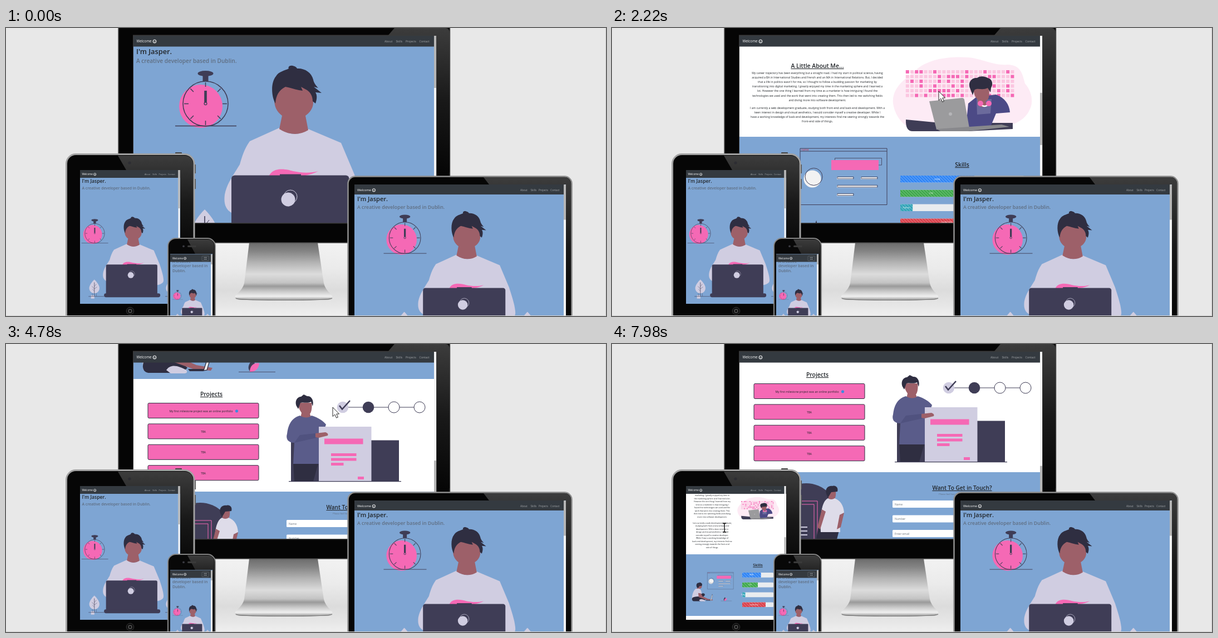
An HTML page that plays this animation: 1078 px wide and 519 px high, repeating every 8000 ms.

```html
<!DOCTYPE html>
<html lang="en">
<head>
<meta charset="utf-8">
<title>Responsive portfolio</title>
<style>
  html, body { margin: 0; width: 100%; height: 100%; overflow: hidden; background: #e8e8e8; }
  svg { display: block; width: 1078px; height: 519px; }
  text { font-family: 'Open Sans', 'Noto Sans', sans-serif; white-space: pre; }
  .mid { text-anchor: middle; }
  .bold { font-weight: 600; }
  .head { font-weight: 600; text-decoration: underline; }
</style>
</head>
<body>
<svg id="stage" viewBox="0 0 1078 519"></svg>
<script>
const BLUE = '#7ea5d3', PINK = '#f569b5', LILAC = '#d0cde1', DARK = '#3f3d56',
      HAIR = '#2f2e41', SKIN = '#9d6069', INK = '#212529', MUTED = '#5f6e82', NAV = '#343a40';

const rect = (x, y, w, h, fill, more = '') =>
  `<rect x="${x}" y="${y}" width="${w}" height="${h}" fill="${fill}" ${more}/>`;
const circle = (x, y, r, fill, more = '') => `<circle cx="${x}" cy="${y}" r="${r}" fill="${fill}" ${more}/>`;
const path = (d, fill, more = '') => `<path d="${d}" fill="${fill}" ${more}/>`;
const line = (d, width = 1, color = DARK) => path(d, 'none', `stroke="${color}" stroke-width="${width}"`);
const text = (x, y, size, fill, str, more = '') =>
  `<text x="${x}" y="${y}" font-size="${size}" fill="${fill}" ${more}>${str}</text>`;
const mid = (x, y, size, fill, str) => text(x, y, size, fill, str, 'class="mid"');
const head = (x, y, size, str) => text(x, y, size, INK, str, 'class="mid head"');
const shift = (y, body) => `<g transform="translate(0 ${y})">${body}</g>`;
const place = (id, x, y, k) => `<use href="#${id}" transform="translate(${x} ${y}) scale(${k})"/>`;
const clip = (id, x, y, w, h) => `<clipPath id="${id}">${rect(x, y, w, h, '#000')}</clipPath>`;
const fade = (id, stops) => `<linearGradient id="${id}" x2="0" y2="1">` +
  stops.map(([o, c]) => `<stop offset="${o}" stop-color="${c}"/>`).join('') + '</linearGradient>';

// Illustrations
function plant(x) {
  return `<g transform="translate(${x} 0)">` +
    path('M0 327C8 335 21 350 21 362C21 376 11 384 0 384C-11 384 -21 376 -21 362C-21 350 -8 335 0 327Z', LILAC) +
    rect(-14, 392, 14, 14, LILAC) + line('M0 339V397', 1.6) +
    line('M0 356L8 346M0 366L-10 355M0 366L11 358M0 375L-8 367M-8 384V397M8 384V397') +
    line('M-24 397H41', 1.4) + '</g>';
}

function stopwatch() {
  let ticks = '';
  for (let a = 0; a < 360; a += 45)
    ticks += `<path d="M0 -38.5V-30.5" stroke="${DARK}" stroke-width="1.5" transform="translate(358.5 136.5) rotate(${a})"/>`;
  return circle(350, 141, 39, PINK) +
    circle(358.5, 136.5, 40.5, 'none', `stroke="${DARK}" stroke-width="1.5"`) + ticks +
    `<ellipse cx="358.5" cy="82" rx="14" ry="5" fill="${DARK}"/>` + rect(353.5, 84, 10, 12, DARK) +
    rect(356.2, 113, 4.6, 21, DARK) + circle(358.5, 136.2, 2.4, PINK, `stroke="${DARK}" stroke-width="1.3"`) +
    line('M304 176.5H414', 1.3);
}

const hero = stopwatch() + plant(357) + plant(673) +
  path('M491 180L438 204C428 218 424 232 420 246C408 266 397 280 393 300C391 316 394 326 405 333L616 350C634 346 643 340 642 328C641 308 632 284 626 264L602 207L543 182Q516 201 491 180Z', LILAC) +
  path('M482 128C482 112 495 102 517 102C540 104 552 116 552 134C552 146 544 154 538 158L543 184Q518 199 491 182L496 158C486 150 482 142 482 128Z', SKIN) +
  path('M484 136C477 124 475 99 485 87C490 78 501 77 508 73C506 70 510 67 515 68C520 69 522 71 523 73C536 72 549 80 552 93C553 99 557 104 561 108L553 106L567 117L556 116C560 122 558 130 556 136L551 132C551 123 547 116 541 112L530 106L533 113C521 112 510 107 502 106C490 112 485 122 484 136Z', HAIR) +
  path('M472 268C478 251 500 253 516 258C530 261 546 262 561 258C546 266 520 270 500 270Z', PINK) +
  rect(492, 263.5, 38, 4, DARK) + rect(405, 265.5, 211.5, 124, DARK, 'rx="6"') +
  rect(397, 384.5, 231.5, 15.8, DARK, 'rx="7"') +
  circle(507, 309, 12.5, LILAC) + circle(511, 304, 12, 'none', `stroke="${LILAC}"`);

function calendar() {
  let seed = 7, cells = '';
  for (let i = 0; i < 144; i++) {
    seed = (seed * 16807) % 2147483647;
    cells += rect(527.8 + (i % 24) * 8.2, 190 + Math.floor(i / 24) * 8.5, 6, 6,
      seed / 2147483647 < 0.35 ? PINK : '#fbc6e0');
  }
  return cells;
}

const about = shift(260,
  path('M505 250C502 220 530 204 548 188C572 168 610 165 640 167C668 170 686 182 710 180C736 180 738 200 742 214C756 230 757 250 750 262C742 280 722 290 690 296L545 299C520 290 508 270 505 250Z', '#fdebf5') +
  calendar() +
  path('M528 279L590 285H720V296L640 300H540Q527 300 528 279Z', DARK) +
  path('M640 250L655 238L690 234C706 240 714 252 715 266L690 268L680 292H636Z', '#4c4a86') +
  path('M655 242H682L680 268L656 270Z', '#6b6a9c') +
  path('M650 220H677C679 236 677 244 671 246L673 254Q664 260 657 252L657 243C652 238 649 232 650 220Z', SKIN) +
  path('M643 222C639 211 647 203 656 204C662 199 672 202 675 204C684 206 685 216 681 222L680 230L675 222C666 227 656 221 651 226L648 235Z', HAIR) +
  line('M659 248Q669 262 680 248', 2.5, '#fff') + circle(662, 250, 5, PINK) + circle(677, 250, 5, PINK) +
  path('M570 246L629 240Q632 240 633 243L642 294L583 297Z', '#9b9b9d') +
  path('M583 296L700 288L714 292L640 300H590Z', '#88888c') + circle(608, 269, 3, '#b5b5b8'));

function pageLine(x, y, w) {
  return rect(x, y, w, 3.6, '#f2f2f2') + line(`M${x + 1} ${y - .6}H${x + w + 1}V${y + 2.6}H${x + 1}Z`, .8);
}

const skills = shift(510,
  line('M338 81H494V182.5H338ZM338 86H494') + text(340, 85.3, 5, '#c8324f', 'name') +
  rect(394, 102, 85, 18, PINK) + line('M400.5 102V98.5H484.5V111H479', .8) +
  circle(360, 136, 15.5, '#f2f2f2') + circle(362.5, 132, 15.5, 'none', `stroke="${DARK}"`) +
  pageLine(404, 133, 29) + pageLine(447, 133, 29) + pageLine(404, 148, 72) + pageLine(404, 163, 29)) +
  shift(580,
  path('M278 90H304C306 99 303 107 296 109C292 110 290 111 289 117L270 112L279 104Z', SKIN) +
  path('M274 99C269 85 275 74 287 74C293 71 299 73 301 76C308 79 308 88 304 93L297 94C291 92 288 96 287 101L280 106Q276 104 274 99Z', HAIR) +
  path('M268 110L288 109C299 114 303 126 305 146L296 164L262 172L247 180C242 158 252 122 268 110Z', LILAC) +
  path('M296 146C304 138 314 135 321 141L323 148L306 166Z', HAIR) +
  path('M247 166C258 154 296 154 312 162L326 176L316 185H256C247 184 244 176 247 166Z', HAIR) +
  path('M283 136L299 138L309 156L342 171L371 176L368 181L336 178L286 160Z', SKIN) +
  path('M288 180C296 168 310 172 324 180Q328 186 318 186H296Z', LILAC) +
  path('M327 178H355V182H330Z', HAIR) +
  path('M355 181L367 143L369 152L361 180Z', '#f2f2f2', `stroke="${HAIR}" stroke-width="1.3"`) +
  path('M439 183C432 176 437 168 443 161C450 170 449 178 439 183Z', DARK) +
  path('M438 183C438 172 446 166 455 168C454 178 447 184 438 183Z', PINK) + line('M418 183.4H484', .8));

const ring = `stroke="${DARK}" stroke-width="1"`;
const planner = shift(713,
  line('M605 114H733') + circle(605, 114, 10.3, LILAC) + circle(651, 114, 10.3, DARK) +
  circle(697, 114, 10, '#fff', ring) + circle(743, 114, 10, '#fff', ring) + line('M599 111L604 117.5L618 102', 2.6) +
  rect(512, 176, 50, 71.5, DARK) + rect(656, 173.5, 50, 74, DARK) +
  path('M516 212H562L552 247.5H518Z', HAIR) +
  path('M525 106H549C551 118 547 125 546 126L549 134L528 138L531 124Q525 116 525 106Z', SKIN) +
  path('M522 112C518 102 524 95 530 95L535 91L541 94C548 93 554 101 551 112L548 104C541 108 534 104 529 106L525 117Z', HAIR) +
  path('M528 129Q540 136 549 129C562 133 570 139 575 145L572 154L562 158V216H516L518 178C508 178 502 172 505 162C507 144 514 133 528 129Z', '#5a5c8a') +
  rect(562, 149, 94.5, 98.5, LILAC) + path('M518 178L558 169L556 161L528 164Z', '#50527f') +
  path('M556 161L574 159Q580 161 578 165L562 169L556 168Z', SKIN) +
  rect(572, 170.5, 69.5, 10, PINK) + rect(584, 197, 45.5, 5, PINK) + rect(584, 205.5, 45.5, 5, PINK) +
  rect(584, 214, 22.5, 5, PINK) + rect(632, 239, 11, 5, PINK) + line('M508 247.6H710', 1.2));

const contact = shift(748,
  circle(349, 307, 56, DARK) + line('M334 283H369V355M334 289H363V355', 1, PINK) +
  [329, 336, 343].map(y => rect(338, y, 13, 2, LILAC)).join('') +
  path('M370 333L410 328L403 356H366Z', HAIR) +
  path('M387 265H402C403 276 400 279 399 280L400 287L389 288L389 278Z', SKIN) +
  path('M385 270C382 260 389 255 396 256C403 254 407 260 405 266L394 267L388 277Z', HAIR) +
  path('M388 278Q394 282 400 278C410 282 416 290 417 304L409 308L410 339H375C374 310 376 284 388 278Z', '#dedce9') +
  path('M409 308L417 304L411 330L404 334Z', SKIN) + path('M377 298L384 302L374 334L369 330Z', SKIN));

// Page text and widgets
const story = [
  `My career trajectory has been everything but a straight road. I had my start in political science, having
acquired a BA in International Studies and French and an MA in International Relations. But, I decided
that a life in politics wasn't for me, so I thought to follow a budding passion for marketing by
transitioning into digital marketing. I greatly enjoyed my time in the marketing sphere and I learned a
lot. However the one thing I learned from my time as a marketer is how intriguing I found the
technologies we used and the work that went into creating them. This then led to me switching fields
and diving more into software development.`,
  `I am currently a web development graduate, studying both front-end and back-end development. With a
keen interest in design and visual aesthetics, I would consider myself a creative developer. While I
have a working knowledge of back-end development, my interests find me veering strongly towards the
front-end side of things.`];

function wrap(str, max) {
  const rows = [''];
  for (const word of str.split(/\s/)) {
    const last = rows[rows.length - 1];
    if ((last + ' ' + word).length > max) rows.push(word);
    else rows[rows.length - 1] = last ? last + ' ' + word : word;
  }
  return rows;
}
const column = (rows, x, y, step, size) => rows.map((r, i) => mid(x, y + i * step, size, INK, r)).join('');

function bars(x, y, w, h, step, size) {
  const list = [['HTML', .6, '#2780f5'], ['CSS', .5, '#37a544'], ['Python', .1, '#2aa0b5'], ['Leadership', .75, '#d93a45']];
  return list.map(([name, part, color], i) => {
    const top = y + i * step;
    return rect(x, top, w, h, '#e9ecef', 'rx="1.5"') + rect(x, top, w * part, h, color, 'rx="1"') +
      rect(x, top, w * part, h, 'url(#stripes)') + mid(x + w * part / 2, top + h / 2 + size * .35, size, '#fff', name);
  }).join('');
}

const intro = (x, y1, s1, y2, s2) => text(x, y1, s1, INK, "I'm Jasper.", 'class="bold"') +
  text(x, y2, s2, MUTED, 'A creative developer based in Dublin.', 'class="bold"');

function brand(x, y, size) {
  return text(x, y, size, '#fff', 'Welcome') +
    `<g transform="translate(${x + size * 5.15} ${y - size * .35}) scale(${size / 6.3})" stroke="#fff">` +
    circle(0, 0, 3, 'none') + path('M-1.5 .6Q0 2.4 1.5 .6M-1.2 -1.2V-.4M1.2 -1.2V-.4', 'none', 'stroke-width=".8"') + '</g>';
}
const links = (xs, y, size) => ['About', 'Skills', 'Projects', 'Contact']
  .map((s, i) => text(xs[i], y, size, '#a4a7aa', s)).join('');

const field = (y, label) => rect(504, y, 249, 13, '#fff', 'rx="1.5"') + text(508, y + 8.5, 5, '#6c757d', label);
const card = (i, label) => rect(255, 819.5 + i * 37.4, 199, 27, PINK, `stroke="${HAIR}" rx="2"`) +
  mid(354.5 - (i ? 0 : 4), 835.5 + i * 37.4, 5, INK, label);

const desktopPage = rect(229, 14, 541, 391, BLUE) + rect(229, 405, 541, 165, '#fff') + rect(229, 570, 541, 206, BLUE) +
  rect(229, 776, 541, 203, '#fff') + rect(229, 979, 541, 300, BLUE) +
  intro(234, 47, 12.8, 63, 10.1) + place('hero', 0, 0, 1) +
  head(369, 446, 10.4, 'A Little About Me...') +
  column(story[0].split('\n'), 369, 457, 8.1, 5) + column(story[1].split('\n'), 369, 519.8, 8.1, 5) + place('about', 0, 0, 1) +
  place('skills', 0, 0, 1) + head(629, 624, 10.4, 'Skills') + bars(518, 640, 222, 12.5, 25.8, 4) +
  head(369, 807, 10.4, 'Projects') + card(0, 'My first milestone project was an online portfolio') +
  circle(414.5, 833.8, 2.6, '#3f8ae0') + [1, 2, 3].map(i => card(i, 'TBA')).join('') + planner + contact +
  head(629, 1011, 10.1, 'Want To Get in Touch?') + mid(629, 1020, 4, MUTED, 'Please feel free to send me a message below') +
  field(1030, 'Name') + field(1056.5, 'Number') + field(1083, 'Enter email');

const small = story.map(s => wrap(s, 42));
const smallTop = 592 - (small[0].length - 8) * 5.55;
const tabletPage = rect(133, 256, 180, 267, BLUE) + rect(133, 523, 180, 174, '#fff') + rect(133, 697, 180, 111, BLUE) +
  rect(133, 808, 180, 200, '#fff') + intro(136.5, 279, 8.6, 290.5, 6.9) + place('hero', 3.1, 310.6, .436) +
  head(180, smallTop - 9, 7.1, 'A Little About Me...') + column(small[0], 180, smallTop, 5.55, 3.45) +
  column(small[1], 180, 641.5, 5.55, 3.45) + place('about', 73.8, 466, .3) +
  place('skills', 70, 552, .3) + head(262, 719, 7.1, 'Skills') + bars(234, 730, 56, 8.7, 17.8, 3);

const bar = (x, y, w, h, id, thumb) => rect(x, y, w, h, '#f4f4f4') + rect(x, y, w, thumb, '#b6b6b6', `id="${id}"`);

const monitor = rect(376, 386, 240, 133, 'url(#floor)') +
  path('M437 387H560L571 460Q573 470 584 480Q592 490 574 490H425Q405 490 414 480Q426 470 428 460Z', 'url(#metal)') +
  line('M413 487Q420 490.5 500 490.5T586 487', 1.2, '#777') +
  rect(202, -20, 595.5, 407, '#050505', 'rx="8" stroke="#4b4b4b" stroke-width="1.5"') +
  path('M698 0H790Q797 0 797 10V260H774V14H686Z', 'url(#gloss)') + rect(228, 12.5, 546, 340, '#3a3a3a') +
  `<g clip-path="url(#deskPage)"><g id="desk">${desktopPage}</g></g>` + rect(229, 14, 541, 19.5, NAV) +
  brand(234.5, 26.3, 6.3) + links([680, 700.5, 718, 742.5], 26, 5.1) + bar(769, 14, 4, 337, 'deskThumb', 94);

const tablet = rect(304, 224, 12, 4, '#444', 'rx="1"') + rect(338, 246, 3, 16, '#555') + rect(338, 272, 3, 18, '#555') +
  rect(108.5, 227.5, 229.5, 330, '#060606', 'rx="17" stroke="#a2a2a2" stroke-width="3"') +
  path('M201 230H320Q336 230 336 247V400L313 380V256H216Z', 'url(#gloss)') +
  circle(222, 243, 2.6, '#2d2d33') + circle(223, 510, 6.8, '#111', 'stroke="#333"') +
  rect(220.3, 507.3, 5.4, 5.4, 'none', 'rx="1.2" stroke="#888" stroke-width=".9"') +
  `<g clip-path="url(#tabPage)"><g id="tab">${tabletPage}</g></g>` + rect(133, 256, 180, 14, NAV) +
  brand(136.5, 265.3, 4.5) + links([249, 263, 274.5, 291], 265, 3.6) + bar(309.5, 256, 3, 241, 'tabThumb', 69);

const laptop = rect(614.5, 267.5, 402, 290, '#060606', 'rx="13" stroke="#8f8f8f" stroke-width="2.5"') +
  path('M858 269H1004Q1015 269 1015 282V519H1006V282H868Z', 'url(#gloss)') +
  `<g clip-path="url(#lapPage)">${rect(626, 282, 380, 240, BLUE)}${intro(631, 312, 11, 326, 8.8)}${place('hero', 465.7, 282.6, .7)}</g>` +
  rect(626, 282, 377, 18, NAV) + brand(631, 294.3, 5.8) + links([924, 942.5, 957, 978], 294, 4.6) + bar(1002, 282.5, 4, 237, 'lapThumb', 63);

const phone = rect(291, 379, 85, 180, '#080808', 'rx="14" stroke="#858585" stroke-width="2"') +
  path('M326 381H362Q374 381 374 393V460L371 455V407H340Z', 'url(#gloss)') +
  rect(326, 391.7, 16, 3.4, '#3a3a3a', 'rx="1.7"') + circle(319, 393.3, 1.9, '#3a3a42') +
  `<g clip-path="url(#phonePage)">${rect(295, 407, 77, 113, BLUE)}` +
  ['A creative', 'developer based in', 'Dublin.'].map((s, i) => text(299, 422.5 + i * 8.8, 6.95, MUTED, s, 'class="bold"')).join('') +
  `${place('hero', 247, 459, .171)}</g>` + rect(295, 407.5, 74, 14, NAV) + brand(299, 416.7, 4.4) +
  rect(352, 411, 12.5, 8.5, 'none', 'rx="1" stroke="#62676c" stroke-width=".7"') +
  line('M355.5 413.5H361M355.5 416.5H361', .8, '#a4a7aa') + bar(368, 408, 3, 112, 'phoneThumb', 18);

const TILE = 5.4, H = TILE / 2;
document.getElementById('stage').innerHTML = '<defs>' +
  clip('deskPage', 229, 33, 541, 318) + clip('tabPage', 133, 256, 180, 241) +
  clip('lapPage', 626, 282, 380, 237) + clip('phonePage', 295, 407, 76, 112) +
  fade('metal', [[0, '#6c6c6c'], [.15, '#858585'], [.35, '#b4b4b4'], [.55, '#dcdcdc'], [.7, '#c4c4c4'], [.76, '#9a9a9a'], [.85, '#c9c9c9'], [.94, '#f0f0f0'], [1, '#9a9a9a']]) +
  fade('floor', [[0, '#f2f2f2'], [.35, '#ebebeb'], [.65, '#dcdcdc'], [.85, '#e6e6e6'], [1, '#f0f0f0']]) +
  fade('gloss', [[0, '#3c3c3c'], [.5, '#191919'], [1, '#060606']]) +
  `<pattern id="stripes" width="${TILE}" height="${TILE}" patternUnits="userSpaceOnUse">` +
  path(`M0 ${H}L${H} ${TILE}H0ZM0 0H${H}L${TILE} ${H}V${TILE}Z`, '#fff', 'opacity=".22"') + '</pattern>' +
  Object.entries({ hero, about, skills }).map(([id, body]) => `<g id="${id}">${body}</g>`).join('') + '</defs>' +
  rect(0, 0, 1078, 519, '#e8e8e8') + monitor + tablet + laptop + phone +
  line('M1077.5 0V518.5H0', 1, '#cfcfcf') +
  `<g id="pointer">${path('M0 0V16.5L3.8 13L6.6 19.2L9.4 18L6.8 12H11.6Z', '#fff', 'stroke="#111" stroke-width=".9"')}</g>` +
  `<g id="beam">${line('M-3 -8H-1Q0 -8 0 -7Q0 -8 1 -8H3M0 -7V7M-3 8H-1Q0 8 0 7Q0 8 1 8H3', 1.4, '#111')}</g>`;

// Motion: rows of [time, value, ...]
const deskScroll = [[770, 0], [1220, 204], [1460, 204], [1610, 260], [1690, 272], [2220, 374], [2300, 374], [2920, 510],
  [3300, 510], [3800, 579], [4160, 580], [4780, 713], [4800, 713], [4940, 748]];
const tabScroll = [[6180, 0], [6340, 24.5], [6640, 24.5], [6950, 73.5], [7200, 73.5], [7980, 318]];
const pointerPath = [[70, 903, 449], [270, 690, 300], [500, 481, 160], [690, 587, 114], [5570, 587, 114], [5790, 324, 255],
  [5870, 324, 255], [6260, 253.5, 322], [7220, 253.5, 322], [7500, 202, 331]];

function at(rows, t, k = 1) {
  const i = rows.findIndex(r => r[0] > t);
  if (i === 0) return rows[0][k];
  if (i < 0) return rows[rows.length - 1][k];
  const a = rows[i - 1], b = rows[i];
  return a[k] + (b[k] - a[k]) * (t - a[0]) / (b[0] - a[0]);
}

const [desk, tab, deskThumb, tabThumb, pointer, beam, stripes] =
  ['desk', 'tab', 'deskThumb', 'tabThumb', 'pointer', 'beam', 'stripes'].map(id => document.getElementById(id));
const move = (node, x, y) => node.setAttribute('transform', `translate(${x} ${y})`);

function draw() {
  const t = performance.now() % 8000;
  const d = at(deskScroll, t), s = at(tabScroll, t);
  move(desk, 0, -d);
  move(deskThumb, 0, d * .275);
  move(tab, 0, -s);
  move(tabThumb, 0, s * .29);
  const x = at(pointerPath, t), y = at(pointerPath, t, 2), overText = t >= 7690;
  move(pointer, x, y);
  move(beam, x, y);
  pointer.style.display = t < 70 || overText ? 'none' : '';
  beam.style.display = overText ? '' : 'none';
  stripes.setAttribute('patternTransform', `translate(${-TILE * (t % 1000) / 1000} 0)`);
  requestAnimationFrame(draw);
}
draw();
</script>
</body>
</html>
```
